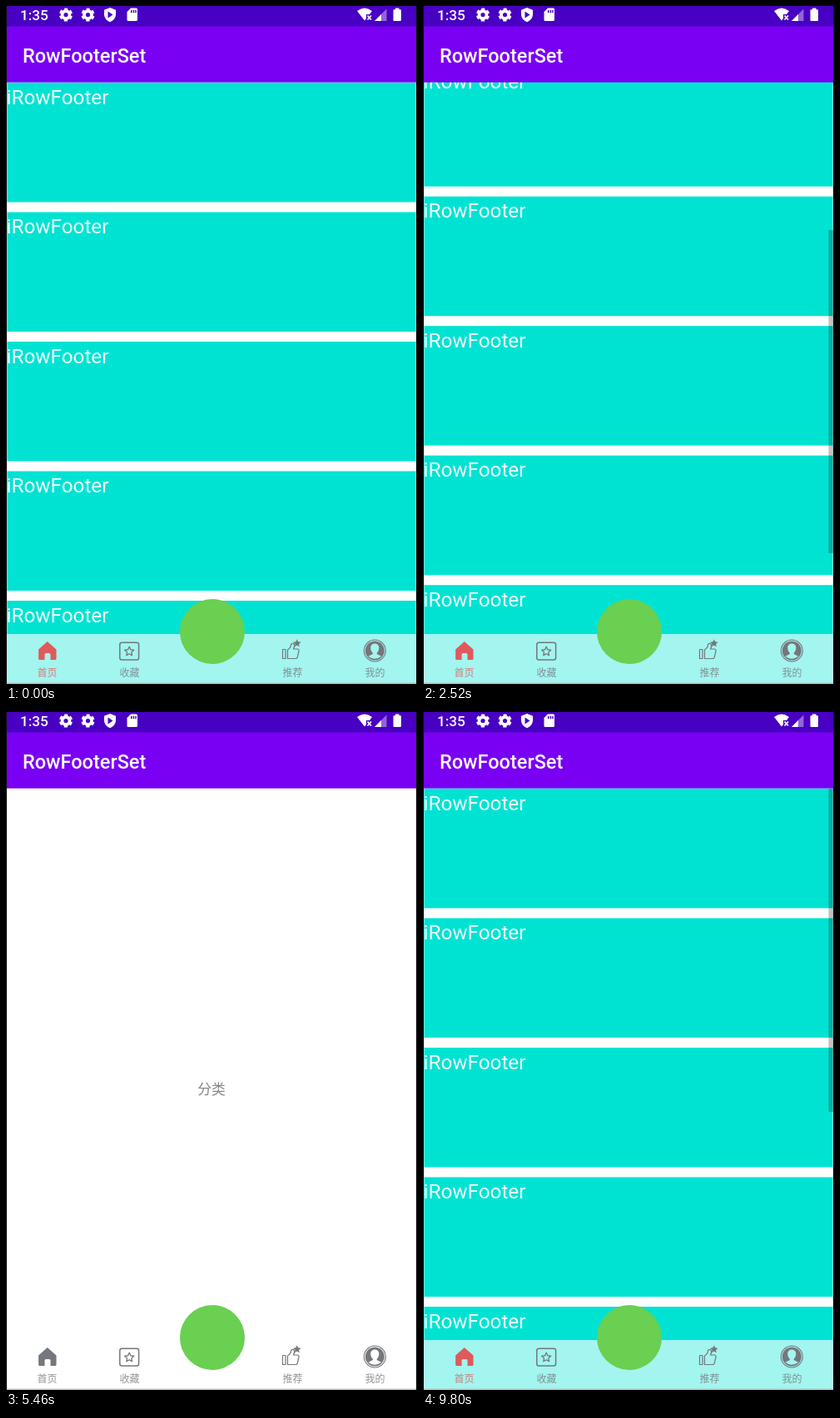
Animation of 494x814 px, one loop 9.87 s. Source, as an HTML page:

```html
<!DOCTYPE html>
<html lang="zh">
<head>
<meta charset="utf-8">
<title>Bottom tabs</title>
<style>
  html, body { margin: 0; width: 100%; height: 100%; overflow: hidden; background: #fff; }
  svg { display: block; width: 494px; height: 814px; }
  text { font-family: Roboto, "Noto Sans CJK SC", "Noto Sans CJK", sans-serif; }
  .label { font: 300 12px "Noto Sans CJK SC", "Noto Sans CJK", sans-serif; text-anchor: middle; opacity: .78; }
  .page { font: 300 16.8px "Noto Sans CJK SC", "Noto Sans CJK", sans-serif; text-anchor: middle; fill: #858585; }
  .tab { fill: #74777b; color: #74777b; }
  .tab.on { fill: #e05a5c; color: #e05a5c; }
  .line { fill: none; stroke: currentColor; stroke-width: 1.5; stroke-linejoin: round; }
</style>
</head>
<body>
<svg viewBox="0 0 494 814">
  <defs>
    <clipPath id="view"><rect y="91" width="494" height="723"/></clipPath>
    <g id="gear" fill="none" stroke="#fff">
      <circle r="4.5" stroke-width="3.8"/>
      <circle r="6.8" stroke-width="2.6" stroke-dasharray="4.100 3.020" stroke-dashoffset="2.050" transform="rotate(-90)"/>
    </g>
  </defs>
  <rect width="494" height="814" fill="#fff"/>

  <g id="home" clip-path="url(#view)">
    <g id="list"></g>
    <rect id="thumb" x="487.5" width="5.500" height="388" fill="#000" fill-opacity=".24"/>
  </g>
  <text id="page" class="page" x="247" y="459"></text>

  <rect y="24" width="494" height="67.700" fill="#7900f3"/>
  <rect width="494" height="24.500" fill="#4800c2"/>
  <text x="20" y="68" font-size="23.500" font-weight="500" fill="#fff">RowFooterSet</text>

  <g fill="#fff">
    <text x="17" y="17" font-size="17.200" font-weight="500">1:35</text>
    <use href="#gear" x="72" y="10.500"/>
    <use href="#gear" x="98.500" y="10.500"/>
    <path fill-rule="evenodd" d="M125 2l7 2.700v5c0 4.500-3 8-7 9.500-4-1.500-7-5-7-9.500v-5zM122.500 6.500v8l6-4z"/>
    <path fill-rule="evenodd" d="M150 2.500h6.500q1.500 0 1.500 1.500v12.500q0 1.500-1.500 1.500h-9.500q-1.500 0-1.500-1.500V7zM150 5v3.200h1.500V5zM152.700 5v3.200h1.500V5zM155.300 5v3.200h1.400V5z"/>
    <path d="M422 6q9-7 18 0l-3 4h-4v5l-2 2.500z"/>
    <path d="M434.500 11.500l4.500 5m0-5l-4.500 5" stroke="#fff" stroke-width="1.700"/>
    <path d="M443 18L457.500 3.500V18z" opacity=".4"/>
    <path d="M443 18L451 10V18z"/>
    <path d="M468 2.500h4.500v1.700h1.500q1 0 1 1V17q0 1-1 1h-7.500q-1 0-1-1V5.200q0-1 1-1h1.500z"/>
  </g>

  <rect y="754" width="494" height="60" fill="#fff" fill-opacity=".64"/>
  <rect y="812.500" width="494" height="1.500" fill="#b9b9b9"/>

  <g class="tab">
    <path d="M49.700 763L60.500 772.500V783.500q0 1.500-1.500 1.500H53.500V778.500q0-1.500-1.500-1.500h-4q-1.500 0-1.500 1.500V785H40.600q-1.500 0-1.500-1.500V772.500z"/>
    <text class="label" x="49.500" y="805">首页</text>
  </g>
  <g class="tab">
    <rect class="line" x="136.800" y="764.300" width="22.800" height="20.800" rx="2.500"/>
    <path id="star" class="line" style="stroke-width:1.300"/>
    <text class="label" x="148.500" y="805">收藏</text>
  </g>
  <circle cx="248" cy="751" r="39" fill="#69d052"/>
  <g class="tab">
    <path class="line" style="stroke-width:1.200" d="M332.500 772.500h3.500v11h-3.500zM338.500 783.500v-10.500q4-2.500 4-6.500 2.800-2.500 4 .5 .500 2.500-1 5h5q2 .500 1.500 2.500l-1.800 7.500q-.500 1.500-2 1.500z"/>
    <path id="smallStar"/>
    <text class="label" x="344.500" y="805">推荐</text>
  </g>
  <g class="tab">
    <circle class="line" cx="443.300" cy="774" r="13" style="stroke-width:1.100"/>
    <path fill-rule="evenodd" d="M443.300 762.500a11.500 11.500 0 1 1-.010 0zM443.300 765.500c-3.500 0-5.300 2.500-5 5.500 .200 2.500 1 4.300 2.500 5.500v1.500l-5.300 2.800q7.500 6 15.600 0l-5.300-2.800v-1.500c1.500-1.200 2.300-3 2.500-5.500 .300-3-1.500-5.500-5-5.500z"/>
    <text class="label" x="443.500" y="805">我的</text>
  </g>

  <path d="M.5 0V814M493.500 0V814" stroke="#111"/>
</svg>
<script>
  const LOOP = 9870, STEP = 70;
  const TOP = 92, PITCH = 155.5, CARD = 143.5, ITEMS = 8;
  const THUMB_RATIO = 0.5365;
  const PAGES = ["", "收藏", "分类", "推荐", "我的"];
  const TAB_OF_PAGE = [0, 1, -1, 2, 3];

  // Each row: time in ms, value
  const pageSteps = [[0, 0], [4410, 1], [5460, 2], [6510, 3], [7280, 4], [8120, 0]];
  const scrollSteps = [
    [0, 0], [980, 0], [2170, 183], [2940, 506], [3080, 506], [3990, 422], [4200, 412],
    [8890, 412], [9170, 200], [9380, 70], [9590, 12], [9730, 0], [LOOP, 0]
  ];
  const thumbSteps = [
    [0, 0], [1049, 0], [1050, 1], [4410, 1], [8260, 1], [8470, 0],
    [8959, 0], [8960, 1], [LOOP, 1]
  ];

  const $ = id => document.getElementById(id);
  const tabs = document.querySelectorAll(".tab");

  function starPath(cx, cy, r) {
    const points = Array.from({ length: 10 }, (_, i) => {
      const a = i * Math.PI / 5, d = i % 2 ? r * 0.48 : r;
      return (cx + d * Math.sin(a)).toFixed(2) + " " + (cy - d * Math.cos(a)).toFixed(2);
    });
    return "M" + points.join("L") + "Z";
  }

  function lerpSteps(steps, t) {
    const i = steps.findIndex(([at]) => at > t);
    const [t0, v0] = steps[i - 1], [t1, v1] = steps[i];
    return v0 + (v1 - v0) * (t - t0) / (t1 - t0);
  }

  const pageAt = t => pageSteps.filter(([at]) => at <= t).pop()[1];

  $("star").setAttribute("d", starPath(148.2, 775, 5.8));
  $("smallStar").setAttribute("d", starPath(349.8, 765.2, 5));
  $("list").innerHTML = Array.from({ length: ITEMS }, (_, i) => {
    const y = TOP + i * PITCH;
    return `<rect x="1.4" y="${y}" width="491.2" height="${CARD}" fill="#00e3d3"/>
      <text x="0.5" y="${y + 25.5}" font-size="24.3" fill="#fff" fill-opacity=".94">iRowFooter</text>`;
  }).join("");

  function draw(t) {
    const page = pageAt(t), scroll = lerpSteps(scrollSteps, t);
    $("home").style.display = page ? "none" : "";
    $("page").textContent = PAGES[page];
    $("list").setAttribute("transform", `translate(0 ${-scroll})`);
    $("thumb").setAttribute("y", TOP + scroll * THUMB_RATIO);
    $("thumb").setAttribute("opacity", lerpSteps(thumbSteps, t));
    tabs.forEach((tab, i) => tab.classList.toggle("on", i === TAB_OF_PAGE[page]));
  }

  const start = performance.now();
  function tick() {
    const t = (performance.now() - start) % LOOP;
    draw(Math.floor(t / STEP) * STEP);
    requestAnimationFrame(tick);
  }
  draw(0);
  requestAnimationFrame(tick);
</script>
</body>
</html>
```
